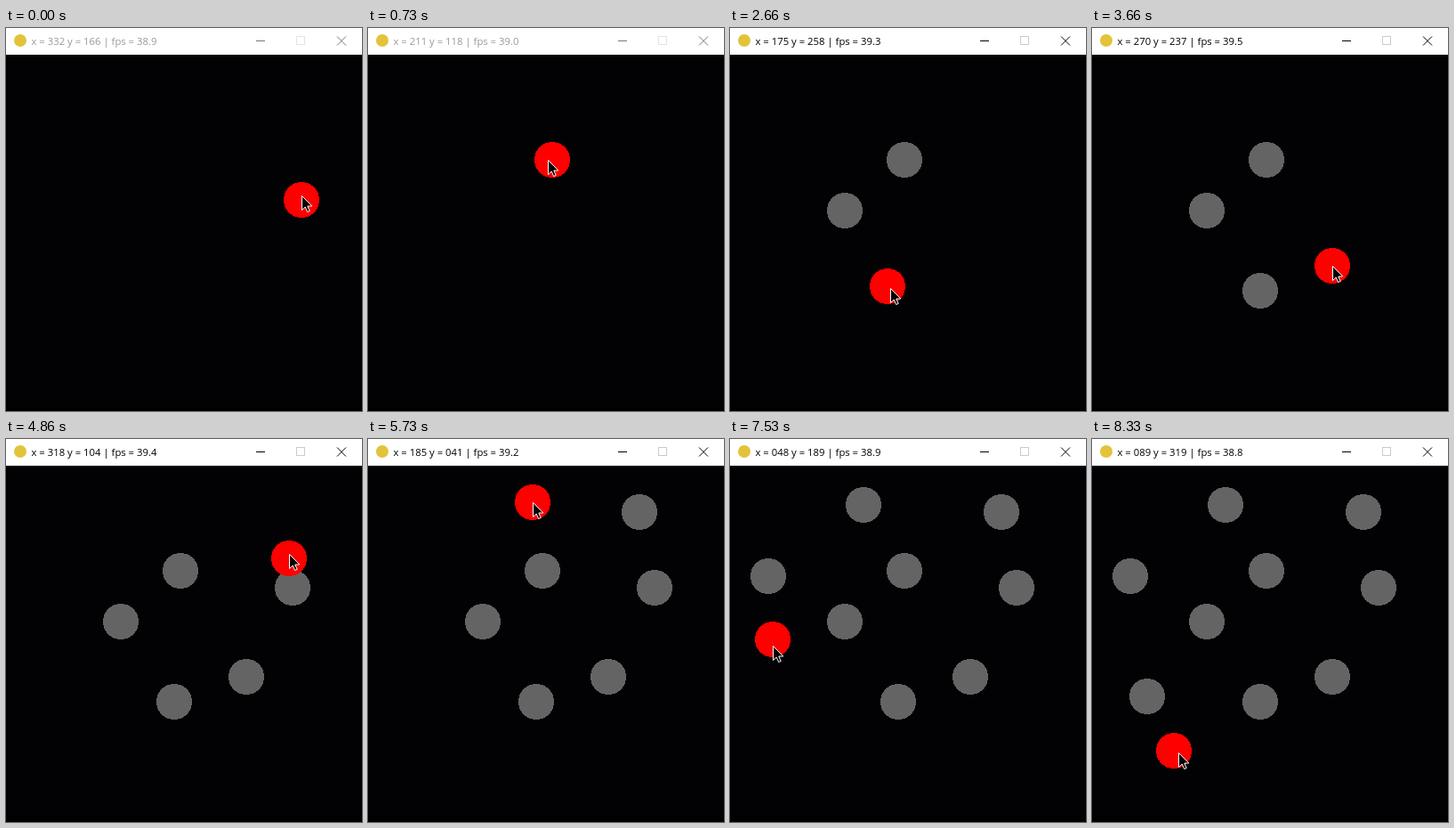
An HTML page with a canvas that plays this animation: 400 by 430 pixels, repeating every 8400 ms.

```html
<!DOCTYPE html>
<html lang="en">
<head>
<meta charset="utf-8">
<title>Dropping discs</title>
<style>
html, body { margin: 0; width: 100%; height: 100%; overflow: hidden; background: #000; }
canvas { display: block; }
</style>
</head>
<body>
<canvas id="stage" width="400" height="430"></canvas>
<script>
const LOOP = 8400, STEP = 1000 / 15;
const ctx = document.getElementById('stage').getContext('2d');

// Mouse route: step, x, y and, where a disc is dropped, the rest in steps
const route = [
  [-.4, 332, 196], [.5, 332, 188], [8, 250, 149], [12.6, 196, 148, 4.9],
  [24.6, 136, 195], [25, 133, 198], [26.6, 129, 205, 2.9],
  [35, 150, 255], [42, 189, 295, 0], [54.6, 270, 267, 1.9],
  [62, 302, 215], [66.6, 322, 167, 1.9],
  [72.6, 318, 134.4], [73, 318, 134], [73.5, 318, 129], [79.6, 305, 82, 1.9],
  [85.6, 185, 71], [86.4, 185, 71], [93, 150, 74, 0],
  [100.6, 16, 149], [101.5, 16, 151], [107, 43, 154, 0],
  [115, 50, 252], [118.6, 62, 289, 1.9],
  [124.6, 89, 349], [125, 92, 350], [125.5, 97, 352]
];
const drops = route.filter(p => p.length > 3);
const path = route.flatMap(([t, x, y, rest]) =>
  rest ? [[t, x, y], [t + rest, x, y]] : [[t, x, y]]);

const arrow = new Path2D('M.5 .5V16.5L4.2 13 6.7 18.5 9.2 17.4 6.8 12H11.8Z');

function slope(i, k) {
  const a = path[i], b = path[i + 1];
  return a && b ? (b[k] - a[k]) / (b[0] - a[0]) : 0;
}

function tangent(i, k) {
  const a = slope(i - 1, k), b = slope(i, k);
  return a * b > 0 ? 2 * a * b / (a + b) : 0;
}

// Monotone cubic interpolation, so that rests stay still
function mouseAt(n) {
  let i = 0;
  while (i < path.length - 2 && path[i + 1][0] <= n) i++;
  const a = path[i], b = path[i + 1], h = b[0] - a[0];
  const u = Math.min(1, Math.max(0, (n - a[0]) / h)), v = 1 - u;
  return [1, 2].map(k =>
    v * v * (1 + 2 * u) * a[k] + u * u * (3 - 2 * u) * b[k] +
    u * v * h * (v * tangent(i, k) - u * tangent(i + 1, k)));
}

function rect(color, x, y, w, h) {
  ctx.fillStyle = color;
  ctx.fillRect(x, y, w, h);
}

// Disc with hard pixel edges
function disc(color, x, y) {
  x = Math.round(x);
  y = Math.round(y);
  for (let r = -20; r < 20; r++) {
    const w = Math.round(Math.sqrt(400 - (r + .5) ** 2));
    rect(color, x - w, y + r, 2 * w, 1);
  }
}

function fpsAt(n) {
  const stop = drops.find(([t, , , rest]) => n > t && n < t + rest);
  return 39.51 - .0103 * Math.abs((stop ? stop[0] : n) - 58);
}

function drawTitle(n) {
  const active = n >= 15, ink = active ? '#000' : '#777';
  const [x, y] = mouseAt(n - .35);
  const pad = v => String(Math.round(v)).padStart(3, '0');

  rect('#fff', 0, 0, 400, 30);
  ctx.fillStyle = '#e3c33a';
  ctx.beginPath();
  ctx.arc(16, 14, 7, 0, 7);
  ctx.fill();

  ctx.font = '11.3px "Open Sans", "Noto Sans", sans-serif';
  ctx.fillStyle = active ? '#000' : '#999';
  ctx.fillText(`x = ${pad(x)} y = ${pad(y - 30)} | fps = ${fpsAt(n).toFixed(1)}`, 28.5, 19);

  rect(ink, 281, 14, 10, 1);
  ctx.strokeStyle = active ? '#ccc' : '#e4e4e4';
  ctx.strokeRect(326.5, 9.5, 9, 9);
  ctx.strokeStyle = ink;
  ctx.stroke(new Path2D('M372 9.5l10 10m0-10l-10 10'));
}

function drawCursor(n) {
  const [x, y] = mouseAt(n + .5);
  ctx.save();
  ctx.translate(Math.round(x), Math.round(y));
  ctx.fillStyle = '#000';
  ctx.strokeStyle = '#fff';
  ctx.fill(arrow);
  ctx.stroke(arrow);
  ctx.restore();
}

function draw(now) {
  const ticks = Math.floor(now % LOOP / 10) + 1;
  const n = Math.floor(ticks * 10 / STEP - 1e-6);
  rect('#020204', 0, 30, 400, 396);
  rect('#000', 0, 426, 400, 4);
  for (const [t, x, y, rest] of drops) if (n >= t + rest / 2) disc('#646464', x, y);
  disc('#f00', ...mouseAt(n));
  drawTitle(n);
  drawCursor(n);
}

const start = performance.now();
function tick() {
  draw(performance.now() - start);
  requestAnimationFrame(tick);
}
tick();
</script>
</body>
</html>
```
